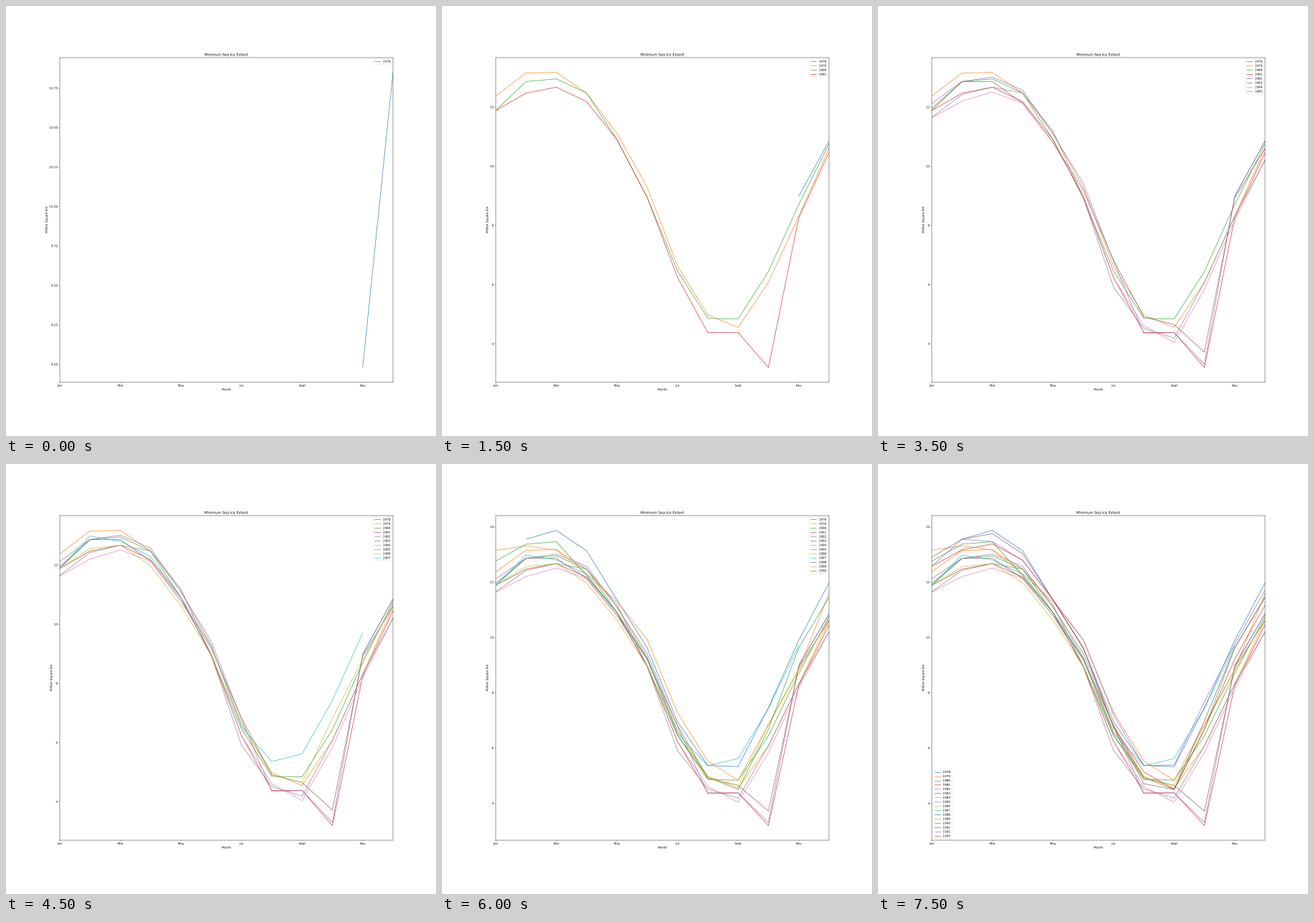
Recreate the animation shown at these times as a matplotlib script. Size 600x600 px, loop 8 s.

```python
import matplotlib.pyplot as plt
import numpy as np
from matplotlib.animation import FuncAnimation
from matplotlib.patheffects import Normal
from matplotlib.text import Text

plt.rcParams.update({
    "font.family": "DejaVu Sans",
    "font.size": 10,
    "axes.linewidth": 1.0,
    "xtick.major.width": 1.0,
    "ytick.major.width": 1.0,
    "text.hinting": "none",
})

FIRST_YEAR = 1978
LAST_YEAR = 1993
MONTHS = ["Jan", "Mar", "May", "Jul", "Sept", "Nov"]

gap = np.nan   # no measurement
o = None       # same as the typical year

# Monthly ice in million square km: a typical year, then each year's departures.
EARLY = [11.88, 12.86, 12.67, 12.47, 10.90, 8.94,
         6.63, 4.91, 4.65, 6.08, 8.31, 10.60]
EARLY_YEARS = {
    1979: [12.37, 13.15, 13.17, o, 11.11, 9.29, o, 4.98, 4.55, o, o, o],
    1980: [o, o, 12.95, o, o, o, 6.46, 4.86, 4.84, 6.44, 8.70, 10.75],
    1981: [o, 12.47, o, 12.18, o, o, 6.24, 4.38, 4.38, 3.20, 8.25, 10.46],
    1982: [12.12, o, 13.01, 12.57, 11.09, 9.42, 6.79, 4.35, 4.38, 3.31, 8.99, 10.84],
    1983: [11.95, o, 12.86, 12.13, 10.80, 9.20, 6.82, o, o, 3.72, 8.92, o],
    1984: [11.63, 12.20, 12.51, 12.12, 10.80, 9.04, 6.23, 4.61, 4.04, 5.84, 8.17, 10.20],
    1985: [11.65, 12.42, o, o, 11.19, o, 5.91, 4.52, 4.19, o, o, 10.20],
    1986: [o, 12.56, o, 11.97, 10.62, o, o, o, o, 6.82, 8.81, 10.67],
    1987: [o, 12.98, 12.80, 12.28, o, 9.27, 6.53, 5.36, 5.62, 7.43, 9.70, gap],
}
LATE = [12.57, 13.55, 13.46, 12.79, 11.36, 9.62,
        6.77, 5.37, 4.50, 6.68, 9.62, 11.45]
LATE_YEARS = {
    1988: [gap, o, 13.87, 13.13, o, o, 6.95, o, 5.33, 7.46, 9.89, 11.97],
    1989: [13.15, 13.31, 13.16, 12.30, 11.30, 9.92, 7.28, 5.53, 4.83, 6.86, 8.85, 11.58],
    1990: [12.76, 13.37, o, 12.23, 10.90, 9.22, 6.47, 4.94, o, o, o, o],
    1991: [o, 13.17, 13.38, o, o, o, o, 5.14, o, o, 9.22, 11.16],
    1992: [o, o, o, o, o, 9.92, 7.20, o, 5.39, 7.67, 9.76, 11.71],
    1993: [12.90, o, 13.75, 13.02, o, o, o, 4.71, o, 6.99, o, o],
}


def fill(typical, years):
    return {year: [t if v is None else v for v, t in zip(row, typical)]
            for year, row in years.items()}


ice = {FIRST_YEAR: [gap] * 10 + [8.98, 10.85]}
ice.update(fill(EARLY, EARLY_YEARS))
ice.update(fill(LATE, LATE_YEARS))

fig = plt.figure(figsize=(20, 20), dpi=30, facecolor="white")
ax = fig.add_axes([0.125, 0.125, 0.775, 0.755])


def update(i):
    ax.clear()
    last = FIRST_YEAR + i
    for year in range(FIRST_YEAR, last + 1):
        ax.plot(range(12), ice[year], label=str(year))
    ax.set_xlim(0, 11)
    ax.set_xticks(range(0, 12, 2), MONTHS)
    ax.set_title("Minimum Sea Ice Extent")
    ax.set_xlabel("Month")
    ax.set_ylabel("Million Square Km")
    ax.legend(loc="lower left" if last == LAST_YEAR else "upper right")

    # Draw text as outlines so that it keeps its sub-pixel position.
    ax.get_yticklabels()
    for text in fig.findobj(Text):
        text.set_path_effects([Normal()])
    return []


anim = FuncAnimation(fig, update, frames=LAST_YEAR - FIRST_YEAR + 1,
                     init_func=lambda: update(0), interval=500,
                     repeat=True, repeat_delay=0)
plt.show()
```
